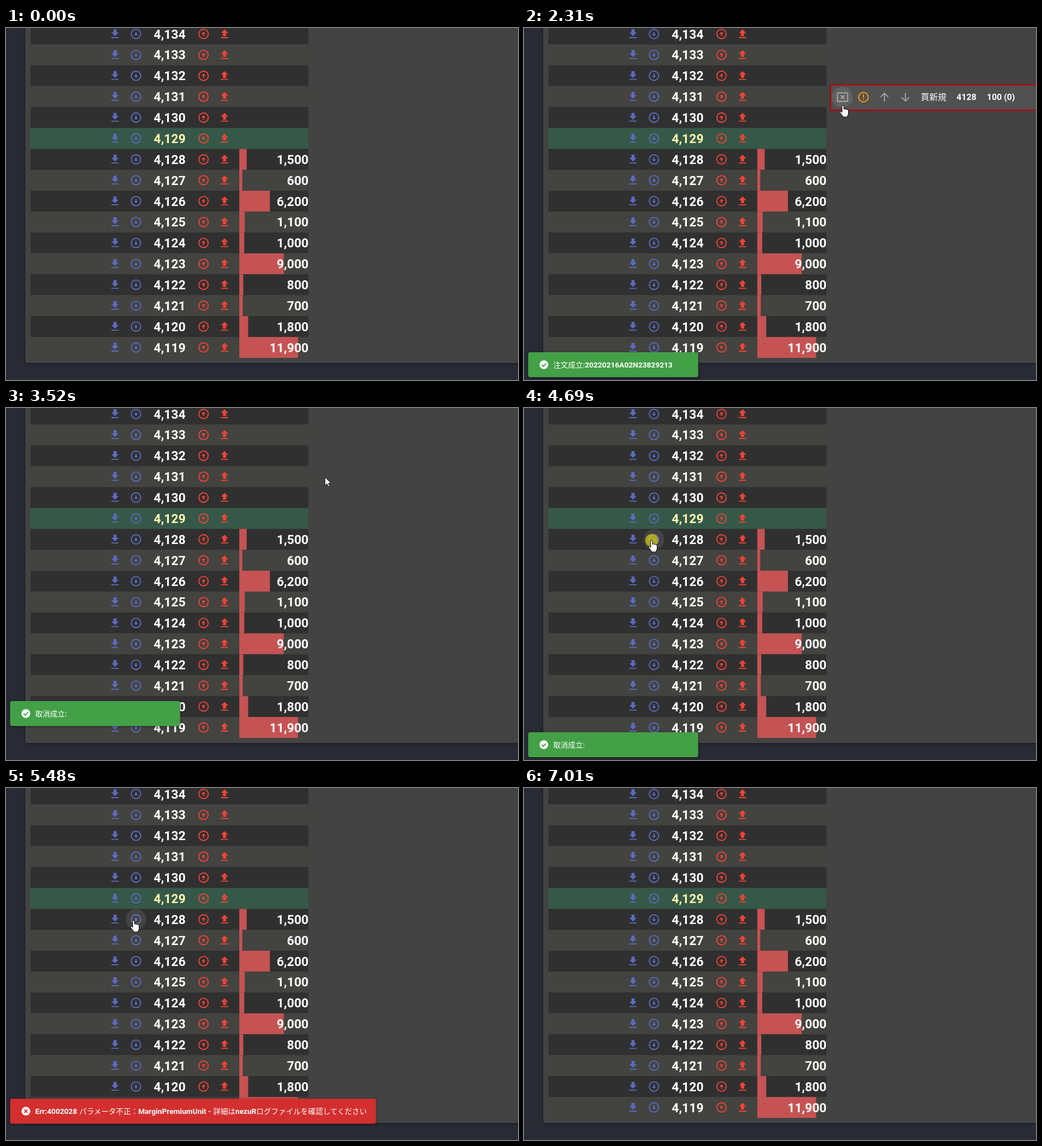
Write an HTML page that moves like this. It is 902 px wide and 621 px high and loops after 7250 ms.

```html
<!DOCTYPE html>
<html lang="ja">
<head>
<meta charset="utf-8">
<title>Order board</title>
<style>
html, body { margin: 0; width: 100%; height: 100%; overflow: hidden; background: #282b34; }
svg { display: block; width: 902px; height: 621px; }
text { font-family: Roboto, "Noto Sans CJK JP", "Noto Sans CJK", sans-serif; fill: #fff; }
.num { font-size: 22.08px; font-weight: 700; }
.msg { font-size: 13.2px; }
.ja { font-size: 13.05px; font-weight: 500; }
.cell { font-size: 15.2px; font-weight: 700; }
.b { font-weight: 700; }
.card { filter: drop-shadow(0 1px 2px rgba(0,0,0,.45)); }
.toast { filter: drop-shadow(0 1px 2px rgba(0,0,0,.4)); }
</style>
</head>
<body>
<svg id="stage" viewBox="0 0 902 621" xmlns="http://www.w3.org/2000/svg">
  <defs>
    <path id="save" d="M5 20h14v-2H5v2zM19 9h-4V3H9v6H5l7 7 7-7z"/>
    <path id="send" d="M9 16h6v-6h4l-7-7-7 7h4zm-4 2h14v2H5z"/>
    <g id="down">
      <circle cx="12" cy="12" r="9" fill="none" stroke="currentColor" stroke-width="2"/>
      <path d="M13 12V8h-2v4H8l4 4 4-4z"/>
    </g>
    <use id="up" href="#down" transform="rotate(180 12 12)"/>
  </defs>
  <rect class="card" x="34" y="-20" width="900" height="611" rx="4" fill="#434343"/>
  <g id="board"></g>

  <g id="order">
    <rect x="540" y="100.3" width="400" height="44.7" fill="#515151" stroke="#b90404" stroke-width="2.2"/>
    <g fill="none" stroke="#a6a6a6" stroke-width="1.8">
      <rect x="552.3" y="114.3" width="18" height="15.2" rx="1"/>
      <path d="M558 118.6l6.6 6.6m0-6.6l-6.6 6.6"/>
      <path d="M635 129.5V115m-6.8 6.8l6.8-6.8 6.8 6.8"/>
      <path d="M672 114.5V129m-6.8-6.8l6.8 6.8 6.8-6.8"/>
      <g stroke="#ffa000"><circle cx="598" cy="122" r="8.4"/><path d="M598 117.2v5.7m0 1.8v2"/></g>
    </g>
    <text class="cell" x="699" y="127.3" style="font-weight:500;font-size:15px">買新規</text>
    <text class="cell" x="762" y="127.3">4128</text>
    <text class="cell" x="815.5" y="127.3">100 (0)</text>
  </g>

  <circle id="hover" r="18.3" fill="#fff" opacity=".09"/>
  <g id="toasts"></g>
  <circle id="press" r="11.2" fill="#d0c410" opacity=".75"/>
  <g id="pointer" fill="#fff" stroke="#000" stroke-linejoin="round">
    <path id="arrow" d="M0 0V15l3.5-3.3 2.4 5.4 2.4-1-2.4-5.3h4.8z" stroke-width=".9"/>
    <path id="hand" d="M-1.9 1.3a1.7 1.7 0 0 1 3.4 0V6.2q1.8-1.2 3 .4 1.6-1 2.7.5 2.2-.6 2.4 1.6V13q0 3-1.7 5v2H-.5v-1.5L-5 12.5q-1-1.8.4-2.4 1.2-.3 2.7 1.7z" stroke-width="1"/>
  </g>
</svg>
<script>
const LOOP = 7250, ROW = 36.87, TOP = -7.92;
const $ = id => document.getElementById(id);
const BLUE = '#5c6bc0', RED = '#f44336';

const icon = (name, x, y, color) =>
  `<use href="#${name}" transform="translate(${x - 11.04} ${y - 11.04}) scale(.92)" fill="${color}" color="${color}"/>`;

// Price ladder
const sizes = [1500, 600, 6200, 1100, 1000, 9000, 800, 700, 1800, 11900];
let html = '';
for (let i = 0; i < 16; i++) {
  const y = TOP + ROW * i, mid = y + ROW / 2, last = i === 5;
  const fill = last ? '#365848' : i % 2 ? '#434340' : '#303030';
  html += `<rect x="43" y="${y}" width="489.7" height="${ROW}" fill="${fill}"/>`
    + icon('save', 192, mid, BLUE) + icon('down', 229, mid, BLUE)
    + icon('up', 348, mid, RED) + icon('send', 385, mid, RED)
    + `<text class="num" x="288.3" y="${mid + 8.1}" text-anchor="middle"${last ? ' style="fill:#fff9b0"' : ''}>${(4134 - i).toLocaleString('en-US')}</text>`;
  const size = sizes[i - 6];
  if (size) {
    html += `<rect x="411" y="${y}" width="${size * .0087}" height="${ROW}" fill="#c55353"/>`
      + `<text class="num" x="533" y="${mid + 8.1}" text-anchor="end">${size.toLocaleString('en-US')}</text>`;
  }
}
$('board').innerHTML = html;

// Messages: y holds [time, top] keys
const GREEN = '#43a047', WARN = '#d32f2f';
const toasts = [
  { color: GREEN, width: 299.5, enter: 1270, leave: 3230, y: [[0, 572]],
    text: '<tspan class="ja">注文成立:</tspan><tspan class="b" x="107.3">20220216A02N23829213</tspan>' },
  { color: GREEN, width: 299.5, enter: 3080, leave: 5010, y: [[3600, 517], [3770, 548], [3820, 556], [3870, 572]],
    text: '<tspan class="ja">取消成立:</tspan>' },
  { color: WARN, width: 644.5, enter: 4890, leave: 6740, y: [[5310, 517], [5480, 548], [5530, 556], [5580, 572]],
    text: '<tspan class="b">Err:4002028</tspan><tspan class="ja" x="129">パラメータ不正：</tspan>'
      + '<tspan class="b" x="233">MarginPremiumUnit -</tspan><tspan class="ja" x="365">詳細は</tspan>'
      + '<tspan class="b" x="404">nezuR</tspan><tspan class="ja" x="441">ログファイルを確認してください</tspan>' }
];
$('toasts').innerHTML = toasts.map(n => {
  const mark = n.color === GREEN ? 'M31.2 22.2l2.7 2.7 5-5.2' : 'M32.2 19.2l5.6 5.6m0-5.6l-5.6 5.6';
  return `<g class="toast"><rect x="7.3" width="${n.width}" height="44" rx="3.7" fill="${n.color}"/>
    <circle cx="35" cy="22" r="7.7" fill="#fff"/>
    <path d="${mark}" fill="none" stroke="${n.color}" stroke-width="1.8"/>
    <text class="msg" x="51.5" y="26.7">${n.text}</text></g>`;
}).join('');
toasts.forEach((n, i) => n.node = $('toasts').children[i]);

const clamp = p => Math.max(0, Math.min(1, p));
const linear = p => p;
const smooth = p => p * p * (3 - 2 * p);
const easeOut = p => 1 - (1 - p) ** 3;

function track(keys, t, ease, col = 1) {
  let k = 0;
  while (k < keys.length - 1 && t >= keys[k + 1][0]) k++;
  const a = keys[k], b = keys[k + 1];
  if (!b) return a[col];
  return a[col] + (b[col] - a[col]) * ease(clamp((t - a[0]) / (b[0] - a[0])));
}

const path = [
  [130, 472, 339], [670, 326, 222], [770, 326, 222], [900, 342, 228],
  [1850, 342, 228], [2310, 562, 137], [2450, 562, 115], [2590, 562, 122],
  [3660, 562, 122], [4420, 218, 224], [4470, 218, 224], [4690, 225, 234],
  [6180, 225, 234], [6760, 873, 624]
];
const presses = [[1150, 1240], [2950, 3040], [4690, 4840]];
const within = (t, a, b) => t >= a && t < b;
const show = (node, on) => node.setAttribute('visibility', on ? 'visible' : 'hidden');
const place = (node, x, y) => node.setAttribute('transform', `translate(${x.toFixed(2)} ${y.toFixed(2)})`);

function draw(t) {
  const x = track(path, t, smooth, 1), y = track(path, t, smooth, 2);
  const open = within(t, 1290, 3080), live = within(t, 160, 6760);
  show($('order'), open);

  const buttons = [[348, 231.7], [229, 231.7]];
  if (open) buttons.push([561, 122]);
  const over = live && buttons.find(b => Math.hypot(x - b[0], y - b[1]) < 18.3);
  show($('hover'), over);
  if (over) place($('hover'), ...over);

  show($('arrow'), live && !over);
  show($('hand'), live && over);
  place($('pointer'), x, y);
  show($('press'), presses.some(p => within(t, ...p)));
  place($('press'), x, y - .5);

  for (const n of toasts) {
    const come = easeOut(clamp((t - n.enter) / 420));
    const go = clamp((t - n.leave) / 260);
    const seen = come * (1 - go);
    show(n.node, seen > 0);
    n.node.setAttribute('opacity', seen.toFixed(3));
    place(n.node, -46 * (1 - come + go * go), track(n.y, t, linear));
  }
}

const start = performance.now();
function tick() {
  draw((performance.now() - start) % LOOP);
  requestAnimationFrame(tick);
}
tick();
</script>
</body>
</html>
```
